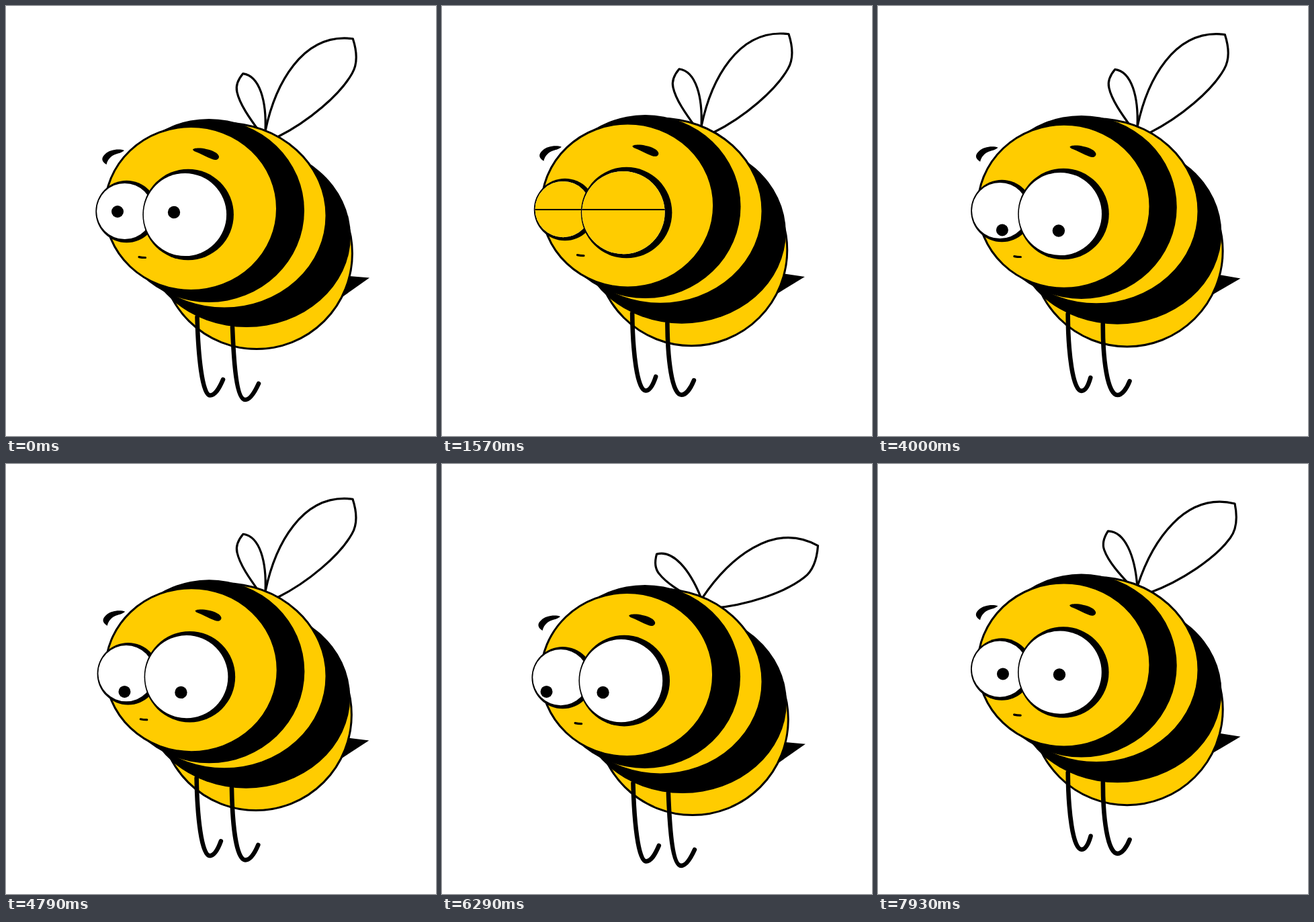
An HTML page that plays this animation: 640x640 px, repeating every 8000 ms.

```html
<!DOCTYPE html>
<html lang="en">
<head>
<meta charset="utf-8">
<title>Bee</title>
<style>
  html, body { margin: 0; width: 100%; height: 100%; overflow: hidden; background: #fff; }
  svg { display: block; width: 100%; height: 100%; }
  .skin { fill: #fc0; stroke: #000; stroke-width: 3; }
  .wing { fill: #fff; stroke: #000; stroke-width: 3.2; stroke-linejoin: round; }
  .leg { fill: none; stroke: #000; stroke-width: 6.6; stroke-linecap: round; }
  .lid { fill: #fc0; stroke: #000; stroke-width: 2; }
</style>
</head>
<body>
<svg viewBox="0 0 640 640">
  <defs>
    <clipPath id="smallEye"><circle cx="176.7" cy="305.5" r="41.6"/></clipPath>
    <clipPath id="bigEye"><circle cx="266.5" cy="310.5" r="61.6"/></clipPath>
  </defs>
  <g id="bee">
    <path id="sting"/>
    <!-- data-lean: how far the part drifts when the bee leans fully -->
    <g data-lean="0 -12.5">
      <path id="wingSmall" class="wing" d="M386 186C388 142 378 104 353 100.5C345 110 342 120 344 128C348 146 362 166 378 188"/>
      <path id="wingBig" class="wing" d="M386 186C400 118 440 39 516 48.5C523 70 522 88 515 100C497 132 450 172 404 195"/>
    </g>
    <circle class="skin" data-lean="-3 -9" cx="373" cy="368.2" r="142.4"/>
    <ellipse data-lean="-2.2 -10" cx="358" cy="342.5" rx="155" ry="135.5"/>
    <path id="legA" class="leg"/>
    <path id="legB" class="leg"/>
    <ellipse class="skin" data-lean="0 -12.5" cx="325" cy="312" rx="152" ry="138"/>
    <ellipse data-lean="1 -11" cx="302" cy="304.5" rx="142" ry="136.5"/>
    <ellipse class="skin" data-lean="2 -8.5" cx="275.3" cy="301.5" rx="128.2" ry="122"/>
    <path data-lean="3.5 -10" d="M176 215C168 212 154 214 148 220C142 225 141 231 149.5 236C151 230 154 225.500 160 222C166 219 172 219 176 215Z"/>
    <path data-lean="10 -9.5" d="M278 214C279 211 290 211 298 213C308 215 316 219 317 224C317 229 312 230 307 228C298 225 289 219 280 216Z"/>
    <g data-lean="6.5 -5.5">
      <path d="M198 373.6Q203 374.6 207.5 374.5" fill="none" stroke="#000" stroke-width="3.2" stroke-linecap="round"/>
      <circle cx="179.5" cy="306" r="46.2"/>
      <circle cx="176.7" cy="305.5" r="41.6" fill="#fff"/>
      <g clip-path="url(#smallEye)">
        <circle class="pupil" cx="166" cy="306" r="9"/>
        <rect class="lid upper" x="120" y="226" width="120" height="80"/>
        <rect class="lid lower" x="120" y="306" width="120" height="80"/>
      </g>
      <circle cx="271.1" cy="310.5" r="67.8"/>
      <circle cx="266.5" cy="310.5" r="61.6" fill="#fff"/>
      <g clip-path="url(#bigEye)">
        <circle class="pupil" cx="250" cy="307" r="9.2"/>
        <rect class="lid upper" x="190" y="216" width="160" height="90"/>
        <rect class="lid lower" x="190" y="306" width="160" height="90"/>
      </g>
    </g>
  </g>
</svg>
<script>
const LOOP = 8000, LEAN_TIME = 3000, FLAP_TIME = 400, DROP = 12.5;
const $ = id => document.getElementById(id);
const all = sel => [...document.querySelectorAll(sel)];
const mix = (a, b, k) => a + (b - a) * k;
const ease = u => (1 - Math.cos(Math.PI * u)) / 2;
const move = (el, x, y) => el.setAttribute('transform', `translate(${x} ${y})`);

// keys: [time, value] pairs in order of time
function track(keys, t, curve = u => u) {
  const i = keys.findIndex(k => k[0] > t);
  if (i < 0) return keys[keys.length - 1][1];
  if (i === 0) return keys[0][1];
  const [t0, a] = keys[i - 1], [t1, b] = keys[i];
  return mix(a, b, curve((t - t0) / (t1 - t0)));
}

const flap = [[0, 0], [14, 1.7], [43, 6.8], [150, 41.5], [200, 44],
              [270, 41.5], [290, 22.6], [330, 6.6], [357, 2.8], [370, 0], [400, 0]];
const gazeX = [[1500, 0], [2500, 14], [4467, 14], [5467, -10.6], [6500, -10.6], [7500, 15.3]];
const gazeY = [[1500, 0], [2500, 28.5], [4467, 28.5], [5467, 20.9], [6500, 20.9], [7500, 6.9]];
const blink = [[1300, 0], [1450, 1], [1650, 1], [1800, 0]];

const morphs = [
  ['sting', 'M500 401L541 404.5L495 437Z', 'M498 393.5L539 401.5L492 427Z'],
  ['legA', 'M284.5 463C286 520 292 579 303.5 579.5C311 579.5 317 570 323 556',
           'M282 453C282 510 289 566 302.5 566.5C308 566.5 312 558 314 548'],
  ['legB', 'M337 478C339 530 343 586 356 586C364 586 371 573 376 562',
           'M334 467C333 520 341 572 356.5 572.5C363 572.5 370 564 374 553']
].map(([id, from, to]) => ({ el: $(id), from, to: to.match(/[\d.]+/g).map(Number) }));

const parts = all('[data-lean]').map(el => ({ el, lean: el.dataset.lean.split(' ').map(Number) }));
const pupils = all('.pupil'), uppers = all('.upper'), lowers = all('.lower');

function draw(t) {
  const lean = ease(t / LEAN_TIME);
  move($('bee'), 0, t < LEAN_TIME ? 0 : DROP * (1 - lean));
  for (const { el, lean: [x, y] } of parts) move(el, x * lean, y * lean);
  for (const { el, from, to } of morphs) {
    let i = 0;
    el.setAttribute('d', from.replace(/[\d.]+/g, n => mix(+n, to[i++], lean)));
  }

  const angle = track(flap, t % FLAP_TIME);
  $('wingBig').setAttribute('transform', `rotate(${angle} 382 190)`);
  $('wingSmall').setAttribute('transform', `rotate(${-1.11 * angle} 386 188)`);

  const x = track(gazeX, t, ease), y = track(gazeY, t, ease);
  pupils.forEach(p => move(p, x, y));

  const open = 70 * (1 - track(blink, t, ease));
  uppers.forEach(l => move(l, 0, -open));
  lowers.forEach(l => move(l, 0, open));
}

const start = performance.now();
function tick() {
  draw((performance.now() - start) % LOOP);
  requestAnimationFrame(tick);
}
tick();
</script>
</body>
</html>
```
